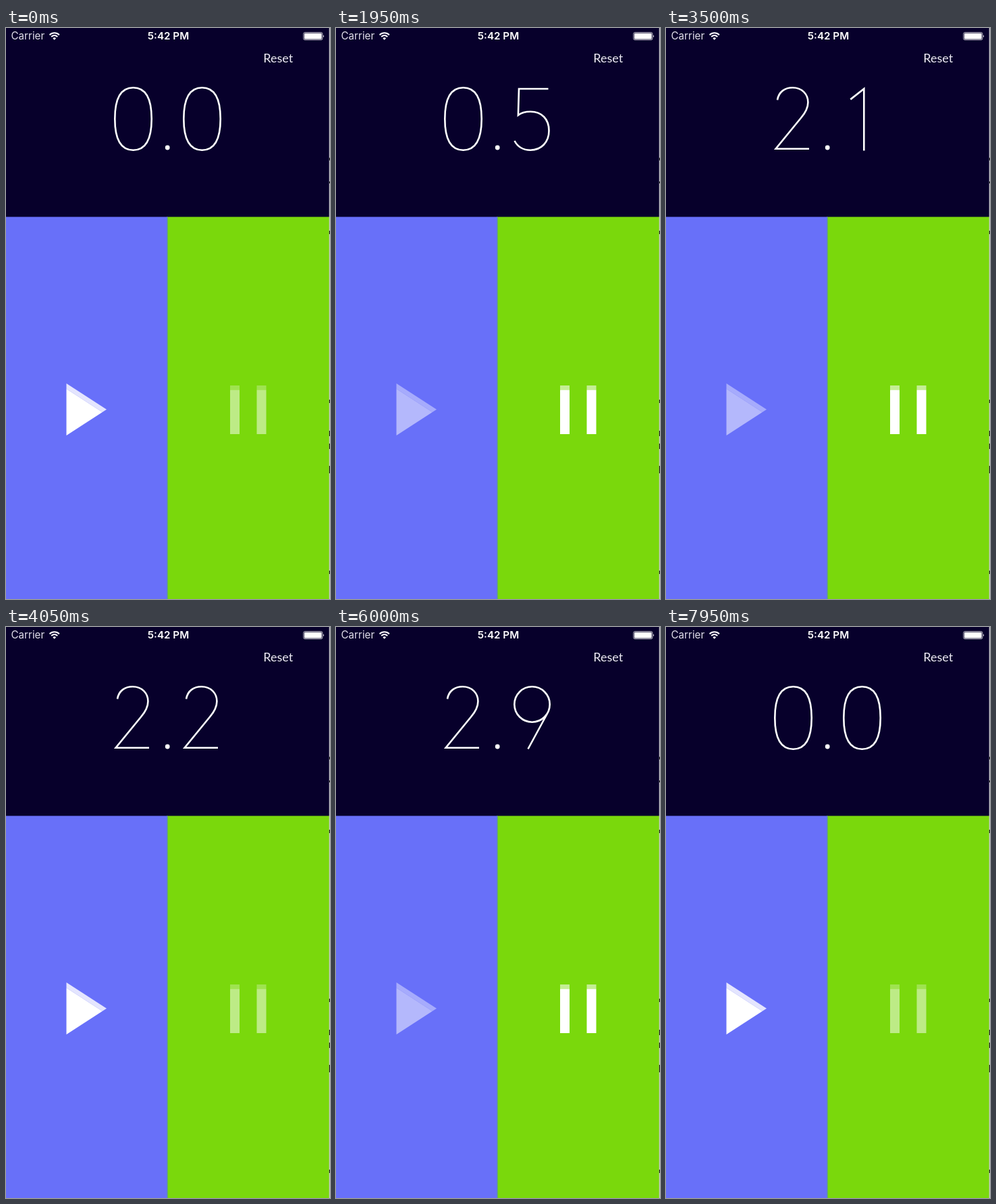
Recreate the animation shown at these times as an HTML page. Size 480 px wide and 845 px high, loop 8000 ms.

```html
<!DOCTYPE html>
<html lang="en">
<head>
<meta charset="utf-8">
<title>Stopwatch</title>
<style>
  html, body { margin: 0; width: 100%; height: 100%; overflow: hidden; background: #07002b; }
  svg { display: block; width: 480px; height: 845px; }
  .status { font: 15.2px Inter, "Open Sans", sans-serif; fill: #e2e0ea; }
  .clock { font-weight: 600; fill: #fff; text-anchor: middle; }
  #reset { font: 18px Lato, sans-serif; fill: #efedf5; text-anchor: middle; }
  .digits { fill: none; stroke: #fff; stroke-width: 2.6; }
  .icon { --body: #fff; --edge: #fff; --edge-alpha: .82; }
  #pause { --edge-alpha: .56; }
  .icon .body { fill: var(--body); }
  .icon .edge { fill: var(--edge); opacity: var(--edge-alpha); }
  .icon.off { opacity: .5; }
  .icon.down { --body: #888; --edge: #77767d; --edge-alpha: 1; }
  #reset.down { opacity: .3; }
</style>
</head>
<body>
<svg viewBox="0 0 480 845">
  <rect width="480" height="845" fill="#07002b"/>
  <rect y="279.5" width="239" height="565.5" fill="#6870f9"/>
  <rect x="239" y="279.5" width="241" height="565.5" fill="#7ad80c"/>
  <rect x="238.2" y="279.5" width="1.4" height="565.5" fill="#5f8bb0"/>

  <!-- sliver of the desktop behind the window -->
  <rect x="478.7" width="1.3" height="845" fill="#c6c6ca"/>
  <path d="M479.4 192v4M479.4 227v3M479.4 300v5M479.4 550v5M479.4 596v8M479.4 615v8M479.4 648v11M479.4 803v5"
        stroke="#222" stroke-width="1.2"/>

  <text class="status" x="7.5" y="17.3">Carrier</text>
  <g fill="none" stroke="#fff" stroke-width="2">
    <path d="M64.6 10.2a10 10 0 0 1 14.3 0M67.2 13a6.4 6.4 0 0 1 9.1 0"/>
    <path d="M71.7 17.8l-2.4-2.5a3.4 3.4 0 0 1 4.8 0z" fill="#fff" stroke="none"/>
  </g>
  <text class="status clock" x="240.5" y="17.3">5:42 PM</text>
  <rect x="440.8" y="6.6" width="28" height="11" rx="2" fill="none" stroke="#fff" stroke-opacity=".75"/>
  <rect x="442" y="7.8" width="25.6" height="8.6" rx="1" fill="#fff"/>
  <path d="M470 10.2q2 1.9 0 3.8z" fill="#fff"/>

  <text id="reset" x="403.2" y="51">Reset</text>

  <g id="readout" role="img">
    <path id="ones" class="digits"/>
    <circle cx="239.2" cy="177" r="3.4" fill="#fff"/>
    <path id="tenths" class="digits" transform="translate(102)"/>
  </g>

  <g id="play" class="icon">
    <path class="edge" d="M89.5 526L149 564.5L142.8 568.5L89.5 534z"/>
    <path class="body" d="M89.5 534L142.8 568.5L89.5 603z"/>
  </g>
  <g id="pause" class="icon">
    <path class="edge" d="M332 529h14v6.5h-14zM371.5 529h14v6.5h-14z"/>
    <path class="body" d="M332 535.5h14v65.5h-14zM371.5 535.5h14v65.5h-14z"/>
  </g>
</svg>
<script>
const LOOP = 8000;

// Thin stroked numerals, drawn in the cell of the first digit.
const GLYPHS = [
  'M188.5 88.3C171 88.3 161.3 102 161.3 134.5S171 180.7 188.5 180.7S215.7 167 215.7 134.5S206 88.3 188.5 88.3z',
  'M171.3 105.6L191.3 90V181.5',
  'M165 106.5C167 94.5 176 88.3 187.5 88.3C201.5 88.3 210.4 98 210.4 110C210.4 119 206 126 200 133L162.6 178.8H212',
  'M166 103C169 93 177 88.3 187 88.3C200 88.3 208.5 97 208.5 109C208.5 123 199 131.5 181 131.5C202 131.5 212 142 212 155.5C212 170 202 180.7 187 180.7C175 180.7 166 175 163 164',
  'M203 181.5V91L161.5 158.5H217',
  'M212.5 90H169L167.9 129C173 125.2 180 123.8 186 123.8C203 123.8 213.5 135 213.5 152C213.5 169 202 180.7 186 180.7C175 180.7 167 175.5 162.5 167',
  'M194.5 88.5L165.4 142M162.3 154.5a26.2 26.2 0 1 0 52.4 0a26.2 26.2 0 1 0 -52.4 0',
  'M162 90H212L177 181.5',
  'M166.5 110a22 21.7 0 1 0 44 0a22 21.7 0 1 0 -44 0M162.5 156.2a26 24.5 0 1 0 52 0a26 24.5 0 1 0 -52 0',
  'M182.5 180.5L211.6 127M162.3 114.5a26.2 26.2 0 1 0 52.4 0a26.2 26.2 0 1 0 -52.4 0'
];

// Each tap acts on release.
const TAPS = [
  { button: 'play', down: 1235, up: 1375 },
  { button: 'pause', down: 3550, up: 3650 },
  { button: 'play', down: 5140, up: 5250 },
  { button: 'pause', down: 6500, up: 6610 },
  { button: 'reset', down: 7770, up: 7865 }
];

const el = id => document.getElementById(id);

function stateAt(t) {
  let tenths = 0, since = null, pressed = null;
  const elapsed = end => since === null ? 0 : Math.floor((end - since) / 100);
  for (const { button, down, up } of TAPS) {
    if (t < down) break;
    if (t < up) { pressed = button; break; }
    tenths += elapsed(up);
    since = button === 'play' ? up : null;
    if (button === 'reset') tenths = 0;
  }
  return { tenths: tenths + elapsed(t), running: since !== null, pressed };
}

function draw(t) {
  const { tenths, running, pressed } = stateAt(t);
  el('ones').setAttribute('d', GLYPHS[Math.floor(tenths / 10) % 10]);
  el('tenths').setAttribute('d', GLYPHS[tenths % 10]);
  el('readout').setAttribute('aria-label', (tenths / 10).toFixed(1));
  el('play').classList.toggle('off', running);
  el('pause').classList.toggle('off', !running);
  for (const id of ['play', 'pause', 'reset']) {
    el(id).classList.toggle('down', pressed === id);
  }
}

const start = performance.now();
function tick() {
  draw((performance.now() - start) % LOOP);
  requestAnimationFrame(tick);
}
tick();
</script>
</body>
</html>
```
